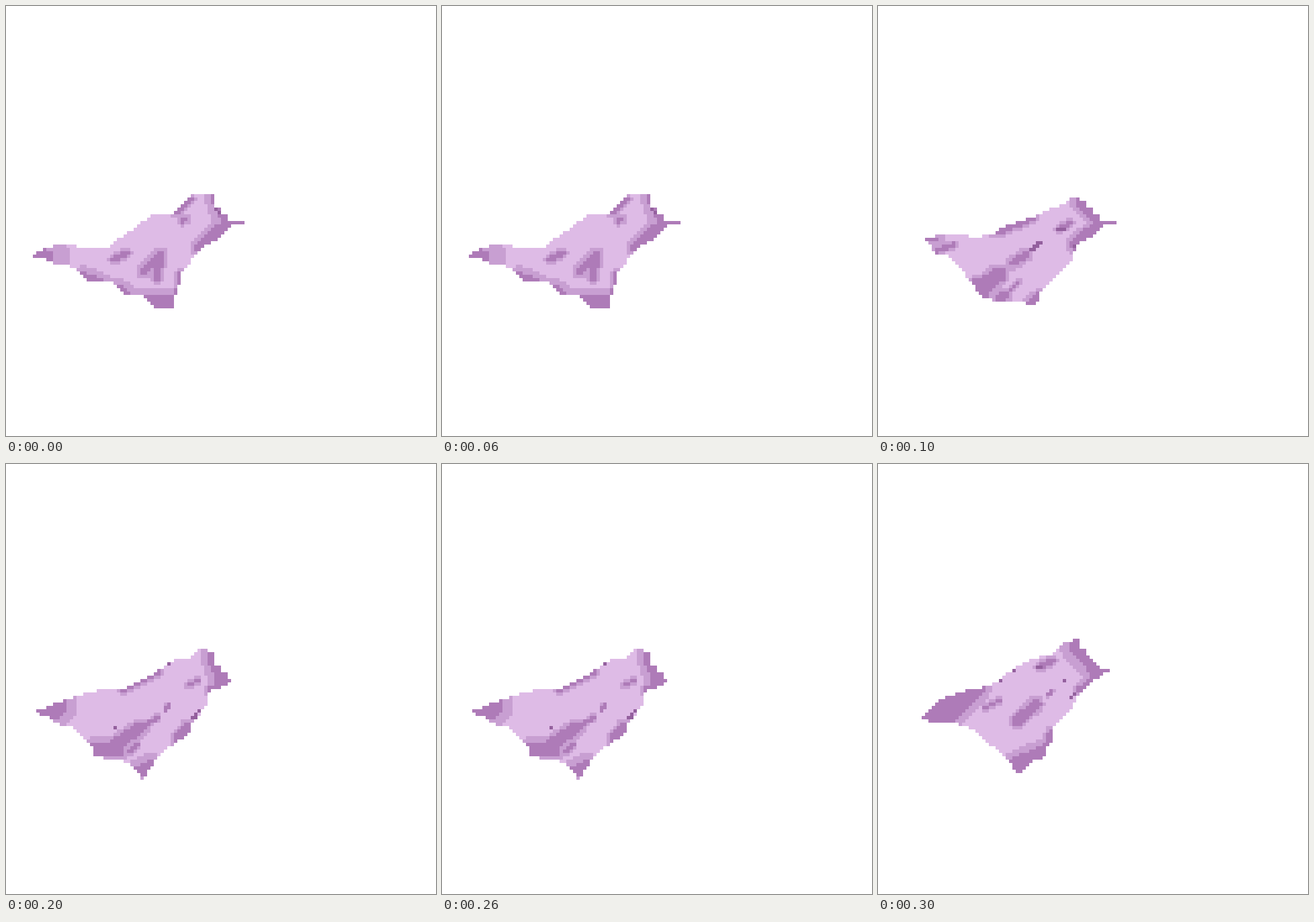
An HTML page with a canvas that plays this animation: 640 by 640 pixels, repeating every 0.4 s.

```html
<!DOCTYPE html>
<html lang="en">
<head>
<meta charset="utf-8">
<title>Fluttering cloth</title>
<style>
  html, body { margin: 0; width: 100%; height: 100%; overflow: hidden; background: #fff; }
  canvas { display: block; width: 640px; height: 640px; image-rendering: pixelated; }
</style>
</head>
<body>
<canvas id="stage" width="128" height="128"></canvas>
<script>
const GRID = 128;
const POSE_MS = 100;
const LIGHT = '#debbe6', MID = '#c89fd2', DARK = '#ae7bb8', DEEP = '#94609e';
const ctx = document.getElementById('stage').getContext('2d');

const brow = 'L62 60 64 60 64 62 66 62 66 64';
const beak = 'L71 64 71 65 67 65 65 68';

// A shadow runs along a segment: dark within `core` cells of it, mid within `rim` cells more.
const shadow = (x1, y1, x2, y2, core, rim = core) => ({ x1, y1, x2, y2, core, rim });
const crease = (x1, y1, x2 = x1, y2 = y1) => ({ ...shadow(x1, y1, x2, y2, 0.6), deep: true });

const beakShadow = shadow(67, 64.5, 71, 64.5, 1);

const spread = {
  outline: `M8 74 15 71 21 71 21 72 30 72 41 64 44 62 50 62 56 56 62 56 ${brow} ${beak}
    L57 73 52 80 51 85 50 86 50 90 45 90 41 86 36 86 31 82 25 82 21 78 12 76 12 75 8 75`,
  shadows: [
    beakShadow,
    shadow(8, 74, 12, 75, 2.5, 4.5),
    shadow(23, 81, 28, 83, 1.8, 2),
    shadow(33, 84, 37, 87, 1.5, 2),
    shadow(42, 89, 50, 89, 2.8, 2.5),
    shadow(51, 86, 52, 80, 0.8),
    shadow(63, 57, 66, 64, 2, 2.2),
    shadow(66, 65, 58, 72, 2, 1.5),
    shadow(50.5, 61.5, 55, 57.5, 0.8),
    shadow(52.5, 64, 53.5, 63.5, 0.8),
    shadow(32, 75.5, 36, 73.5, 0.8),
    shadow(41, 79, 46, 74, 1.1),
    shadow(46, 74, 45, 81, 1),
    crease(62.5, 60.5, 63.5, 61.5),
  ],
};

const gathered = {
  outline: `M14 69 20 68 24 68 29 69 35 67.5 38 65.5 47 62.5 56 58.5 58 57 60 57 60 58 62 58 ${brow} ${beak}
    L59 71 58 75 54 80 49 84 47 89 44 89 44 88 35 88 30 86 28 82.5 21 74 17 74 15 70`,
  shadows: [
    beakShadow,
    shadow(14, 69.5, 17, 69.5, 0.7, 2),
    shadow(17, 73, 23, 71, 0.7),
    shadow(35, 67.5, 46, 63, 1),
    shadow(61, 58, 66, 63, 2.2, 2),
    shadow(66, 65, 59, 71, 1.8, 1.3),
    shadow(31, 83.5, 36, 80, 2.3, 1.2),
    shadow(29, 82, 32, 86, 1),
    shadow(36, 87, 38, 86, 1.5, 1),
    shadow(39, 85, 42, 82, 0.4),
    shadow(45, 88.5, 48, 86, 1),
    shadow(40, 76.5, 44, 74, 1.1),
    shadow(54, 66.5, 57, 64.5, 0.8),
    crease(46, 72.5, 48, 70.5),
    crease(53.5, 66.5, 55.5, 66.5),
    crease(58.5, 71.5),
  ],
};

const swung = {
  outline: `M9 73.5 15 71.3 23 68.5 29 67 35 67 42 63.5 49 59 51 58 55 58 57 55 60 55 60 56 62 56 ${brow}
    L67 64 67 65 60 68 60 72 58 73 58 75 55 77 54.5 80 50 83.5 46 86 42.5 91
    41 94 40 94 40 92 37.5 90 34 88.2 26 87 26 84 20 78.5 16 77.5 13 75.5 9 74`,
  shadows: [
    shadow(9, 74, 14, 72, 4, 3),
    shadow(35, 67, 45, 62, 0.8),
    shadow(62, 57, 65, 65, 2.3, 2),
    shadow(66, 65, 61, 67.5, 1.3, 1),
    shadow(27, 85, 33, 85, 2.4, 1.5),
    shadow(32, 84, 40, 78.5, 1.8, 1.2),
    shadow(41, 78, 45, 75.5, 0.6),
    shadow(37, 85.5, 39, 83.5, 0.7),
    shadow(39, 92, 43, 90, 2, 2.2),
    shadow(51, 82, 54, 78, 1.4, 0.8),
    shadow(54, 66, 57, 64.5, 0.6),
    shadow(47.5, 73, 48.5, 71.5, 0.6, 0.3),
    crease(56, 75.5, 57.5, 73.5),
    crease(32.5, 78.5),
    crease(48.5, 59.5),
  ],
};

const lifted = {
  outline: `M13 75.5 17 71.5 20 69.5 26 67.5 34 65.8 41 60.5 46 58 52 56.5 56 53 58 53 58 52 60 52
    60 55 62 55 62 57 66 60 66 61 69 61 69 62 67 62.5 60 68 58 72 53 77 52 79 52 82 50 84 50 87
    45 89 42 92 41 92 39 88 34 84 29 79 22 77 18 77 13 76`,
  shadows: [
    shadow(17, 76, 28, 65, 4.5, 2),
    shadow(60, 54, 66, 61, 3, 2.8),
    shadow(67, 62, 60, 67, 0.9),
    shadow(41, 90, 50, 86, 2.6, 2),
    shadow(51.5, 80, 51, 86, 1),
    shadow(48, 60.5, 52, 58.5, 0.8),
    shadow(32, 72.5, 36, 70.5, 0.6),
    shadow(41.5, 76.5, 47, 71.5, 1.6, 1),
    shadow(50.5, 69, 52, 67.5, 0.5),
    crease(47.5, 60.5, 48.5, 60.5),
    crease(36.5, 64.5),
    crease(40.5, 61.5),
    crease(55.5, 64.5),
    crease(57.5, 69.5, 58.5, 68.5),
    crease(25.5, 78.5),
  ],
};

const poses = [spread, gathered, swung, lifted];

function distance(x, y, { x1, y1, x2, y2 }) {
  const dx = x2 - x1, dy = y2 - y1;
  const along = ((x - x1) * dx + (y - y1) * dy) / (dx * dx + dy * dy || 1);
  const t = Math.min(1, Math.max(0, along));
  return Math.hypot(x - x1 - t * dx, y - y1 - t * dy);
}

function toneAt(x, y, shadows) {
  let tone = LIGHT;
  for (const s of shadows) {
    const d = distance(x, y, s);
    if (d < s.core) {
      if (s.deep) return DEEP;
      tone = DARK;
    } else if (!s.deep && d < s.core + s.rim && tone === LIGHT) {
      tone = MID;
    }
  }
  return tone;
}

function drawPose({ outline, shadows }) {
  const shape = new Path2D(outline + 'Z');
  ctx.clearRect(0, 0, GRID, GRID);
  for (let y = 0; y < GRID; y++) {
    for (let x = 0; x < GRID; x++) {
      if (!ctx.isPointInPath(shape, x + 0.5, y + 0.5)) continue;
      ctx.fillStyle = toneAt(x + 0.5, y + 0.5, shadows);
      ctx.fillRect(x, y, 1, 1);
    }
  }
}

let shown = -1;
const start = performance.now();

function tick(now) {
  const index = Math.floor(Math.max(0, now - start) / POSE_MS) % poses.length;
  if (index !== shown) {
    shown = index;
    drawPose(poses[index]);
  }
  requestAnimationFrame(tick);
}
tick(start);
</script>
</body>
</html>
```
